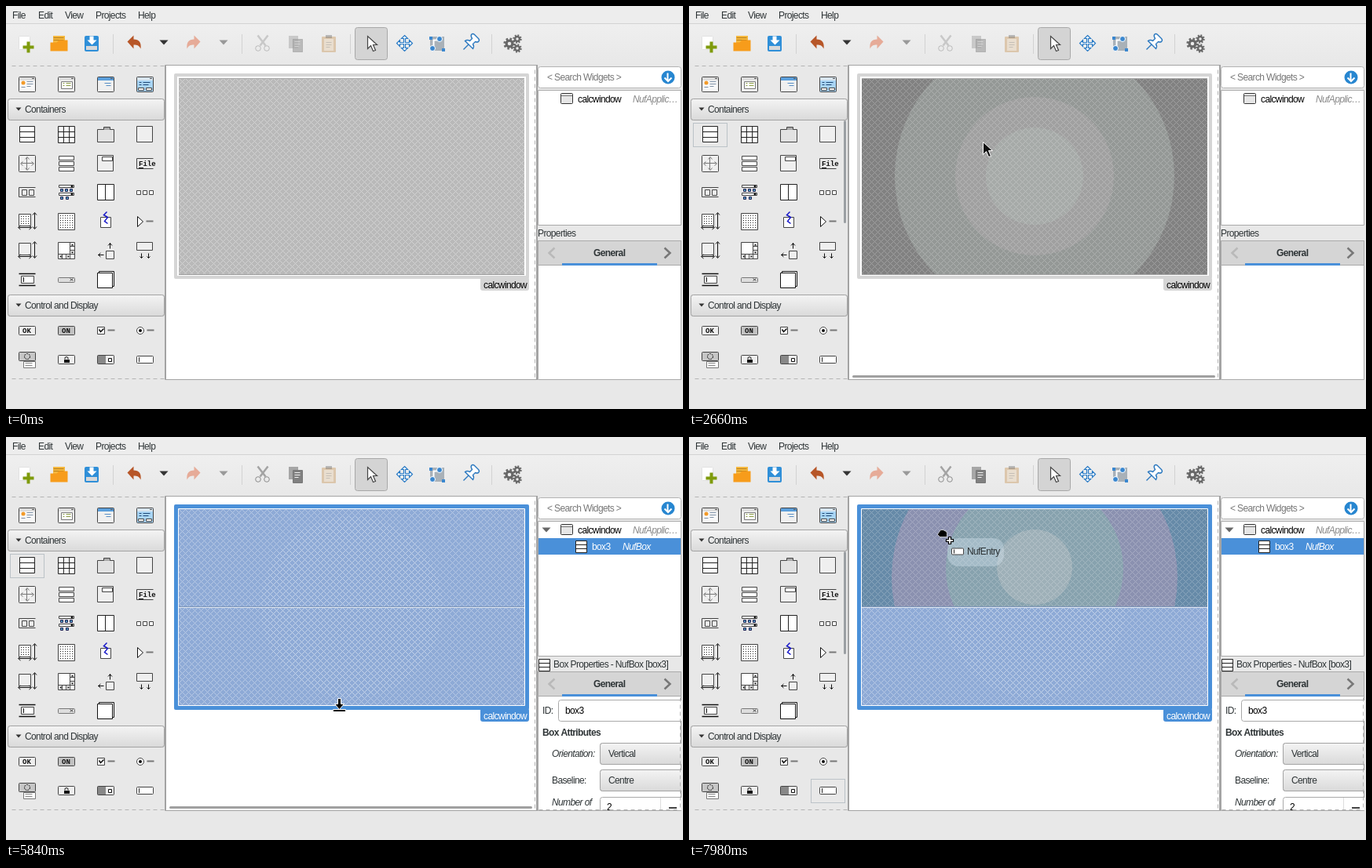
An HTML page with a canvas for the animation above (8 s loop, 862x514 px).

```html
<!DOCTYPE html>
<html lang="en">
<head>
<meta charset="utf-8">
<title>Interface designer</title>
<style>
html, body { margin: 0; width: 100%; height: 100%; overflow: hidden; background: #e8e8e8; }
canvas { display: block; }
</style>
</head>
<body>
<canvas id="stage" width="862" height="514"></canvas>
<script>
const c = document.getElementById('stage').getContext('2d');
const LOOP = 8000, BLUE = '#4a90d9', INK = '#2e3436';
const COLS = [27, 77, 127, 177], ROWS = [99, 164, 201, 238, 275, 312, 349, 414, 451];

// Pointer track: time, x, y
const TRACK = [[1370, 206, 205], [1570, 13, 160], [1920, 13, 160], [2450, 374, 174],
  [3270, 374, 174], [4070, 609, 213], [4290, 609, 213], [4610, 599, 278], [4940, 599, 278],
  [5180, 524, 300], [5680, 524, 300], [5840, 425, 343], [6000, 320, 365], [6480, 94, 240],
  [6520, 94, 240], [7280, 173, 447], [7580, 173, 447], [7980, 322, 124], [LOOP, 322, 124]];

const clamp = v => Math.max(0, Math.min(1, v));
const within = (t, a, b) => t >= a && t < b;

function pointerAt(t) {
  const i = TRACK.findIndex(k => k[0] > t);
  const [t0, x0, y0] = TRACK[i - 1], [t1, x1, y1] = TRACK[i];
  const u = (t - t0) / (t1 - t0);
  return { x: Math.round(x0 + (x1 - x0) * u), y: Math.round(y0 + (y1 - y0) * u) };
}

// Drawing helpers
function box(x, y, w, h, fill, stroke, r = 0) {
  c.beginPath();
  if (stroke) c.roundRect(x + .5, y + .5, w - 1, h - 1, r);
  else c.roundRect(x, y, w, h, r);
  if (fill) { c.fillStyle = fill; c.fill(); }
  if (stroke) { c.strokeStyle = stroke; c.lineWidth = 1; c.stroke(); }
}
function shape(x, y, d, stroke, fill, width = 1) {
  const p = new Path2D(d);
  c.save();
  c.translate(x - .5, y - .5);
  if (fill) { c.fillStyle = fill; c.fill(p); }
  if (stroke) { c.strokeStyle = stroke; c.lineWidth = width; c.stroke(p); }
  c.restore();
}
function text(s, x, y, color = INK, style = '') {
  c.font = `${style} 12px "Liberation Sans", sans-serif`;
  c.letterSpacing = '-0.62px';
  c.fillStyle = color;
  c.fillText(s, x, y);
}
function label(s, x, y) {
  c.font = 'bold 9px "Liberation Mono", monospace';
  c.letterSpacing = '0px';
  c.fillStyle = '#111';
  c.fillText(s, x, y);
}
function dashed(x0, y0, x1, y1, color = '#b4b4b4', dash = [5, 4]) {
  c.save();
  c.setLineDash(dash);
  shape(0, 0, `M${x0 + 1} ${y0 + 1}L${x1 + 1} ${y1 + 1}`, color);
  c.restore();
}
function dot(x, y, r, fill, stroke) {
  c.beginPath();
  c.arc(x, y, r, 0, 7);
  if (fill) { c.fillStyle = fill; c.fill(); }
  if (stroke) { c.strokeStyle = stroke; c.lineWidth = 1; c.stroke(); }
}
function faded(alpha, draw) {
  c.save();
  c.globalAlpha *= alpha;
  draw();
  c.restore();
}
function vertical(y0, y1, a, b) {
  const g = c.createLinearGradient(0, y0, 0, y1);
  g.addColorStop(0, a);
  g.addColorStop(1, b);
  return g;
}
function button(x, y, w, h, focus, r = 3) {
  box(x, y, w, h, '#ededed', '#a9a9a9', r);
  faded(focus, () => box(x, y, w, h, vertical(y, y + h, '#f4f4f4', '#d9d9d9'), '#a3a3a3', r));
}
function dots(x, y, w, h) {
  c.fillStyle = '#222';
  for (let i = 3; i < w - 1; i += 3) for (let j = 3; j < h - 1; j += 3) c.fillRect(x + i, y + j, 1, 1);
}
function gear(x, y, r) {
  c.save();
  c.strokeStyle = '#686868';
  c.lineWidth = r * .55;
  c.beginPath(); c.arc(x, y, r * .65, 0, 7); c.stroke();
  c.setLineDash([r * .39, r * .39]);
  c.beginPath(); c.arc(x, y, r, 0, 7); c.stroke();
  c.restore();
}
const boxIcon = (x, y) => shape(x, y, 'M-6-7h14v15h-14zM-6-2h14M-6 3h14', '#222', '#fff');
function windowIcon(x, y, head, body) {
  box(x - 11, y - 9, 22, 20, body, '#444', 1);
  box(x - 10, y - 8, 20, 4, head);
  c.fillStyle = '#555';
  c.fillRect(x + 6, y - 7, 3, 1);
}
function entryIcon(x, y, w = 22, h = 10) {
  box(x - w / 2, y - h / 2, w, h, '#fff', '#444', 1);
  c.fillStyle = '#222';
  c.fillRect(x - w / 2 + 3, y - h / 2 + 2, 1, h - 4);
}

function menuAndToolbar(focus, selected) {
  box(0, 0, 862, 514, '#ededed');
  faded(focus, () => {
    box(0, 23, 862, 52, vertical(23, 75, '#efefef', '#e8e8e8'));
    box(0, 75, 862, 439, '#e8e8e8');
  });
  box(0, 22, 862, 1, '#d2d2d2');
  faded(.5 + focus / 2, () => [['File', 8], ['Edit', 41], ['View', 75], ['Projects', 114], ['Help', 168]]
    .forEach(([s, x]) => text(s, x, 16)));
  for (const x of [136, 300, 438, 618]) box(x, 36, 1, 25, '#d2d2d2');

  box(16, 38, 15, 18, '#fff', '#e1e1e1', 1);
  shape(28, 52, 'M-1-6h4v5h5v4h-5v5h-4v-5h-5v-4h5z', null, '#7f9b0c');
  box(60, 38, 15, 9, '#f5b83e');
  shape(67, 47, 'M-6-6h13M-6-3h13', '#b9801c');
  shape(67, 47, 'M-10 0h8l3-3h11v14h-22z', null, '#f79c1b');
  box(100, 38, 18, 20, '#2f8fd8', null, 2);
  box(102, 51, 14, 5, '#d6d8da');
  shape(109, 44, 'M-2-5h5v5h4l-6 6-6-6h3z', null, '#fff');

  const undo = 'M-9 0l8-8v5c7 0 10 4 9 12-2-4-4-5-9-5v5z';
  shape(164, 46, undo, null, '#b75628');
  c.save();
  c.translate(476, 0); c.scale(-1, 1);
  shape(238, 46, undo, null, '#e6ab98');
  c.restore();
  const drop = 'M-5-3h11l-5.500 6z';
  faded(.5 + focus / 2, () => {
    shape(201, 47, drop, null, '#333');
    shape(277, 47, drop, null, '#999');
  });

  faded(selected ? 1 : .5, () => {
    shape(327, 47, 'M-6-9L4 4M7-9L-3 4', '#a3a3a3', null, 2.5);
    dot(321, 54, 3.3, null, '#8d8d8d');
    dot(332, 54, 3.3, null, '#8d8d8d');
    box(360, 38, 12, 16, '#a6a6a6');
    box(365, 42, 13, 17, '#fff', '#777');
    box(366, 43, 11, 15, '#808080');
    shape(371, 50, 'M-3-4h7M-3-1h7M-3 2h5', '#f2f2f2');
  });
  faded(.45, () => {
    box(402, 39, 18, 20, '#c99b62', null, 1);
    box(407, 37, 8, 4, '#777');
    box(405, 42, 12, 15, '#f9f9f9');
    shape(411, 50, 'M-3-3h7M-3 0h7M-3 3h5', '#999');
  });

  box(444, 27, 42, 42, '#d4d4d4', '#a8a8a8', 3);
  shape(461, 39, 'M0 0V16l4-4 3 7 3-1-3-7h5z', '#444', '#fff', 1.2);
  shape(508, 48, 'M0-10l4 4h-3v5h5v-3l4 4-4 4v-3h-5v5h3l-4 4-4-4h3v-5h-5v3l-4-4 4-4v3h5v-5h-3z', '#2779c4', '#fff', 1.2);
  box(540, 39, 18, 18, '#a9b1b8');
  shape(549, 48, 'M-4 5V-4H5', '#fff', null, 2);
  for (const [x, y] of [[552, 42], [543, 54]]) dot(x, y, 3.5, '#3a87cf', '#fff');
  box(539, 39, 4, 4, '#3a87cf'); box(555, 54, 4, 4, '#3a87cf');
  shape(592, 47, 'M1-10q2-2 4 0l5 5q2 2 0 4-2 1-4 0l-3 3q2 3 0 6l-10-10q3-2 6 0l3-3q-2-3-1-5zM-3 3l-6 6', '#2b78bf', '#fff', 1.4);
  gear(641, 48, 6); gear(651, 42, 4.5); gear(651, 54, 4.5);
}

function header(name, y, focus) {
  button(2, y, 200, 28, focus);
  faded(.5 + focus / 2, () => {
    shape(16, y + 14, 'M-3-2h7l-3.5 4z', null, '#333');
    text(name, 24, y + 18);
  });
}

function palette(focus) {
  dashed(7, 76, 202, 76);
  dashed(7, 475, 202, 475);
  header('Containers', 118, focus);
  header('Control and Display', 368, focus);
  const [a, b, d, e] = COLS, G = '#444', K = '#111';

  windowIcon(a, 99, '#ddd', '#f8f8f8');
  dot(22, 98, 2.5, '#f39b2a');
  shape(a, 100, 'M0-3h8M0 0h8M0 3h5M-7 4h5', '#7c8fa5');
  windowIcon(b, 99, '#ddd', '#f8f8f8');
  box(70, 96, 15, 10, '#fff', '#777');
  shape(b, 101, 'M-4-2h2M0-2h6M-4 1h2M0 1h6', '#8a9b45');
  windowIcon(d, 99, '#5b9fdc', '#f0f0f0');
  shape(d, 100, 'M-1-1h8M1 2h6', '#5b8fc5');
  windowIcon(e, 99, '#d8e5ef', '#a8d4f4');
  shape(e, 100, 'M-7-2h3M-2-2h9M-7 1h3M-2 1h7', '#204a77');
  box(168, 104, 8, 4, '#fff', G); box(178, 104, 8, 4, '#fff', G);

  shape(a, 164, 'M-9-10h19v20h-19zM-9-3h19M-9 4h19', '#222', '#fff');
  shape(b, 164, 'M-10-10h21v21h-21zM-3-10v21M4-10v21M-10-3h21M-10 4h21', '#222', '#fff');
  shape(d, 164, 'M-10-6h8v-3h8v3h5v16h-21zM-2-6h8', G, '#e2e2e2');
  box(125, 155, 7, 3, '#aaa');
  box(166, 153, 21, 21, '#efefef', G);

  box(16, 190, 22, 22, '#efefef', G, 1);
  shape(a, 201, 'M0-7V8M-7 0H8M-2-5l2.5-3 2.5 3M-2 6l2.5 3 2.5-3M-5-2l-3 2.5 3 2.5M6-2l3 2.5-3 2.5', '#777');
  for (const y of [191, 198, 205]) box(67, y, 20, 6, '#fff', G);
  box(116, 190, 21, 21, '#efefef', G); box(122, 192, 14, 6, '#fff', G);
  shape(e, 201, 'M11-6h-21v13h21', G);
  label('File', 169, 204);
  box(169, 206, 6, 1, K);

  shape(a, 238, 'M11-6h-21v12h21', G);
  box(20, 234, 7, 8, '#eee', G); box(29, 234, 7, 8, '#eee', G);
  box(67, 228, 20, 4, '#fff', G); box(67, 238, 20, 4, '#fff', G);
  for (const [x, y] of [[69, 233], [75, 233], [81, 233], [69, 243], [76, 243]]) box(x, y, 4, 4, '#4f9bbd', '#225');
  dot(84, 230, 1.5, K); dot(84, 240, 1.5, K);
  shape(d, 238, 'M-10-10h21v20h-21zM0-10v20', '#222', '#fff');
  for (const x of [166, 174, 182]) box(x, 235, 6, 6, '#fff', G);

  const arrows = 'M10-9V10M7.500-7l2.500-3 2.500 3M7.500 8l2.500 3 2.500-3M-10 9H5M-8 6.500l-3 2.500 3 2.500M3 6.500l3 2.500-3 2.500';
  box(16, 265, 16, 16, '#fff', G); dots(16, 265, 16, 16); shape(a, 274, arrows, K);
  box(66, 264, 22, 22, '#fff', G); dots(66, 264, 22, 22);
  box(120, 269, 14, 14, '#fff', G);
  shape(d, 271, 'M2-8l-4 4 5 3-4 5 4 3', '#1616c8', null, 1.5);
  shape(e, 275, 'M-9-6v13l7-6.500z', K, '#fff');
  shape(e, 275, 'M2 0h9', '#777', null, 2);

  box(16, 302, 16, 16, '#efefef', G); shape(a, 311, arrows, K);
  box(66, 301, 22, 22, '#fff', G);
  shape(b, 312, 'M5-10v21M-10 5h21M5-5h6M5 0h6M-5 5v6M0 5v6', G);
  shape(b, 312, 'M6-6l2-2 2 2zM6 2l2 2 2-2zM-6 6l-2 2 2 2zM2 6l2 2-2 2z', null, K);
  box(127, 312, 11, 11, '#efefef', G);
  shape(d, 312, 'M6-2v-7M3.500-6l2.500-3 2.500 3M-2 6h-7M-6 3.500l-3 2.500 3 2.500', K);
  box(166, 301, 21, 11, '#efefef', G);
  shape(e, 318, 'M-4-2v6M5-2v6M-6 2l2 2 2-2M3 2l2 2 2-2', K);

  shape(a, 349, 'M-10-7h21M-10 8h21', K, null, 1.5);
  box(19, 344, 17, 10, '#fff', G); box(22, 346, 1, 6, K);
  box(66, 346, 22, 7, '#ddd', '#777', 1);
  shape(b, 350, 'M5-2l4 3M9-2l-4 3', '#555');
  box(118, 338, 20, 20, '#fff', K); box(116, 340, 20, 20, '#fff', K);

  box(16, 408, 22, 12, '#eee', G, 1); label('OK', 21, 417);
  box(66, 408, 22, 12, '#c2c2c2', G, 1); label('ON', 71, 417);
  box(116, 409, 10, 10, '#fff', G);
  shape(121, 414, 'M-2-1l2 3 4-4', K, null, 1.6);
  dot(171, 414, 4.5, '#fff', G); dot(171, 414, 2, K);
  for (const x of [d, e]) shape(x, 414, 'M3 0h9', '#777', null, 2);

  box(16, 441, 22, 12, '#c6c6c6', G, 1);
  c.save(); c.setLineDash([2, 1]); dot(27, 447, 3.500, null, K); c.restore();
  box(22, 453, 16, 9, '#fff', '#777');
  shape(a, 457, 'M-2-1h9M-2 2h9', '#888');
  box(66, 445, 22, 12, '#eee', G, 1);
  box(74, 451, 7, 4, K); shape(b, 451, 'M-1.500 0v-2q2-2 4 0v2', K);
  box(116, 445, 22, 12, '#888', G, 1); box(127, 446, 10, 10, '#eee'); box(130, 449, 5, 5, '#fff', K);
  entryIcon(e, 451);
}

// Crosshatch tile of single pixels, repeated from the corner of each slot
const hatch = (() => {
  const size = 8, tile = document.createElement('canvas');
  tile.width = tile.height = size;
  const g = tile.getContext('2d');
  g.fillStyle = '#fff';
  for (let i = 0; i < size; i++) {
    g.fillRect(i, i, 1, 1);
    if (i !== size / 2) g.fillRect(i, (size - i) % size, 1, 1);
  }
  return c.createPattern(tile, 'repeat');
})();

function slot(y, h, base, rings, glow) {
  c.save();
  c.beginPath(); c.rect(220, y, 441, h); c.clip();
  box(220, y, 441, h, rings ? rings[0] : base);
  if (rings) rings.slice(1).forEach(([r, cy, color]) => dot(440, y + cy, r, color));
  c.translate(220, y);
  faded(rings ? .24 : .36, () => box(0, 0, 441, h, hatch));
  if (glow && !rings) faded(.2, () => dot(220, 217 - y, 116, hatch));
  c.restore();
}

function workspace(t, selected, drop) {
  box(202, 75, 475, 402, '#fff', '#a3a3a3');
  box(203, 75, 1, 402, '#a3a3a3');
  box(675, 75, 2, 402, '#a3a3a3');
  dashed(673, 81, 673, 476);
  const frame = selected ? BLUE : '#d5d5d5';
  box(214, 86, 452, 262, frame, null, 2);
  box(604, 346, 62, 17, frame, null, 3);
  text('calcwindow', 608, 360, selected ? '#fff' : '#000');
  if (selected) {
    const rings = ['#668aa8', [182, 87, '#8b91b0'], [113, 76, '#87a2ae'], [48, 74, '#9eb0b8']];
    slot(92, 125, '#8eaad6', drop === 'top' && rings, true);
    slot(217, 126, '#8eaad6', drop === 'bottom' && rings, true);
    box(220, 216, 441, 1, '#7d95b8');
    box(220, 217, 441, 1, '#dfe7f2');
    box(219, 91, 442, 252, null, '#fff');
  } else {
    box(218, 90, 444, 254, '#fff');
    slot(92, 251, '#b9b9b9', drop && ['#818181', [178, 125, '#949896'], [101, 125, '#a0a0a0'], [62, 125, '#a6aaa8']]);
    box(220, 92, 441, 1, '#a9a9a9');
    box(220, 342, 441, 1, '#999');
    box(660, 92, 1, 251, '#fff');
  }
  if (within(t, 800, 2870) || within(t, 5000, 6900)) box(208, 471, 462, 3, '#a0a0a0', null, 1.5);
}

function inspector(focus, selected) {
  box(677, 77, 183, 28, '#fff', '#b2b2b2', 3);
  text('< Search Widgets >', 689, 95, '#777');
  dot(843, 91, 8.5, '#2786d0');
  shape(843, 91, 'M0-5V5M-4 1L.5 5.500 5 1', '#fff', null, 2);

  box(677, 107, 183, 173, '#fff', '#a9a9a9');
  box(706, 111, 16, 14, '#e6e6e6', '#333', 1);
  box(707, 114, 14, 1, '#777');
  text('calcwindow', 728, 123, '#000');
  text('NufApplic…', 798, 123, '#888', 'italic');
  if (selected) {
    shape(688, 119, 'M-5-3h11l-5.500 6z', null, '#666');
    box(678, 129, 181, 21, BLUE);
    boxIcon(732, 140);
    text('box3', 746, 144, '#fff');
    text('NufBox', 785, 144, '#fff', 'italic');
    boxIcon(685, 291);
    text('Box Properties - NufBox [box3]', 697, 294);
  } else faded(.5 + focus / 2, () => text('Properties', 677, 294));

  box(677, 299, 183, 178, '#fff', '#a9a9a9');
  box(677, 299, 183, 32, '#d5d5d5', '#a9a9a9');
  box(708, 328, 121, 3, BLUE);
  faded(.5 + focus / 2, () => text('General', 748, 319, INK, 'bold'));
  shape(695, 315, 'M4-6l-7 6.500 7 6.500', '#b9b9b9', null, 2.5);
  shape(842, 315, 'M-3-6l7 6.500-7 6.500', focus > .5 ? '#777' : '#aaa', null, 2.5);
  if (!selected) return;

  c.save();
  c.beginPath(); c.rect(677, 331, 183, 145); c.clip();
  text('ID:', 683, 353);
  box(703, 335, 170, 28, '#fff', '#a9a9a9', 3);
  text('box3', 712, 353, '#000');
  text('Box Attributes', 683, 381, INK, 'bold');
  text('Orientation:', 695, 408, INK, 'italic');
  button(756, 390, 120, 28, 1);
  text('Vertical', 767, 408);
  text('Baseline:', 695, 442);
  button(756, 424, 120, 28, 1);
  text('Centre', 767, 442);
  text('Number of', 695, 470, INK, 'italic');
  box(756, 459, 120, 28, '#fff', '#a9a9a9', 3);
  text('2', 765, 476, '#000');
  box(833, 460, 1, 20, '#ddd');
  box(844, 472, 10, 2, '#444');
  dashed(858, 332, 858, 476);
  dashed(678, 475, 858, 475);
  c.restore();
}

function dialog(t) {
  box(398, 192, 270, 112, '#ededed', '#a3a3a3');
  text('Number of items:', 414, 223);
  box(512, 204, 144, 30, '#fff', t < 4780 ? BLUE : '#a9a9a9', 3);
  text(t < 4150 ? '3' : '2', 521, 223);
  box(592, 205, 1, 28, '#ddd');
  box(624, 205, 1, 28, '#ddd');
  box(603, 218, 10, 2, '#444');
  shape(640, 219, 'M-4.500.500h10M.500-4.500v10', '#444', null, 2);
  button(512, 262, 70, 30, 1);
  button(586, 262, 70, 30, 1);
  if (t >= 4780) box(586, 262, 70, 30, '#d0d0d0', '#999', 3);
  text('Cancel', 529, 281);
  text('Create', 604, 281);
}

function pointer(t, { x, y }, dragging) {
  if (dragging) {
    const entry = t > 7000;
    faded(.35, () => box(x + 7, y + 5, entry ? 72 : 66, 36, '#dbe9f2', null, 14));
    if (entry) entryIcon(x + 20, y + 22, 16, 9);
    else { c.save(); c.translate(x + 20, y + 22); c.scale(.8, .8); boxIcon(0, 0); c.restore(); }
    text(entry ? 'NufEntry' : 'NufBox', x + 32, y + 26);
    shape(x, y, 'M-4-1l3-4h3l4 2 1 2v5h-9l-3-3z', '#fff', '#000', .7);
    shape(x + 10, y + 8, 'M-1-4h3v3h3v3h-3v3h-3v-3h-3v-3h3z', '#000', '#fff', 1.2);
  } else if (x > 214 && x < 666 && y >= 340 && y <= 350) {
    shape(x, y, 'M-1-9h4v7h4l-6 7-6-7h4zM-7 5h16v3h-16z', '#fff', '#000');
  } else {
    shape(x + 1, y, 'M0 0V16l4-4 3 7 3-1-3-7h5z', '#fff', '#111');
  }
}

function render(now) {
  const t = now % LOOP;
  const focus = t < 4000 ? 1 - clamp((t - 2860) / 40) : clamp((t - 4960) / 200);
  const selected = t >= 4990;
  const dragging = within(t, 1960, 2640) || t >= 7620;
  const at = t >= 1370 ? pointerAt(t) : null;

  let drop = null;
  const carried = within(t, 1960, 2870) || t >= 7620;
  if (carried && at.x > 220 && at.y < 343) drop = at.y < 217 ? 'top' : 'bottom';

  menuAndToolbar(focus, selected);
  if (at && at.x < 202 && !dragging && (t < 1960 || t > 6500)) {
    const row = ROWS.find(y => Math.abs(at.y - y) <= 18);
    const left = 2 + 50 * Math.floor((at.x - 2) / 50);
    if (row) box(left, row - 18, 50, 37, vertical(row - 18, row + 19, '#fff', '#f1f1f1'), '#a9a9a9', 3);
  }
  palette(focus);
  if (within(t, 1960, 2870) || selected) {
    const [x, y] = t >= 7620 ? [155, 436] : [5, 149];
    c.save();
    c.setLineDash([1, 1]);
    box(x, y, 44, 31, null, '#8f9da6');
    c.restore();
  }
  if (within(t, 1450, 3600) || t >= 6260) box(197, 146, 3, 131, '#9b9fa3', null, 1.5);
  workspace(t, selected, drop);
  inspector(focus, selected);
  if (within(t, 2870, 4940)) dialog(t);
  if (at) pointer(t, at, dragging);
}

const start = performance.now();
(function tick() {
  render(performance.now() - start);
  requestAnimationFrame(tick);
})();
</script>
</body>
</html>
```
